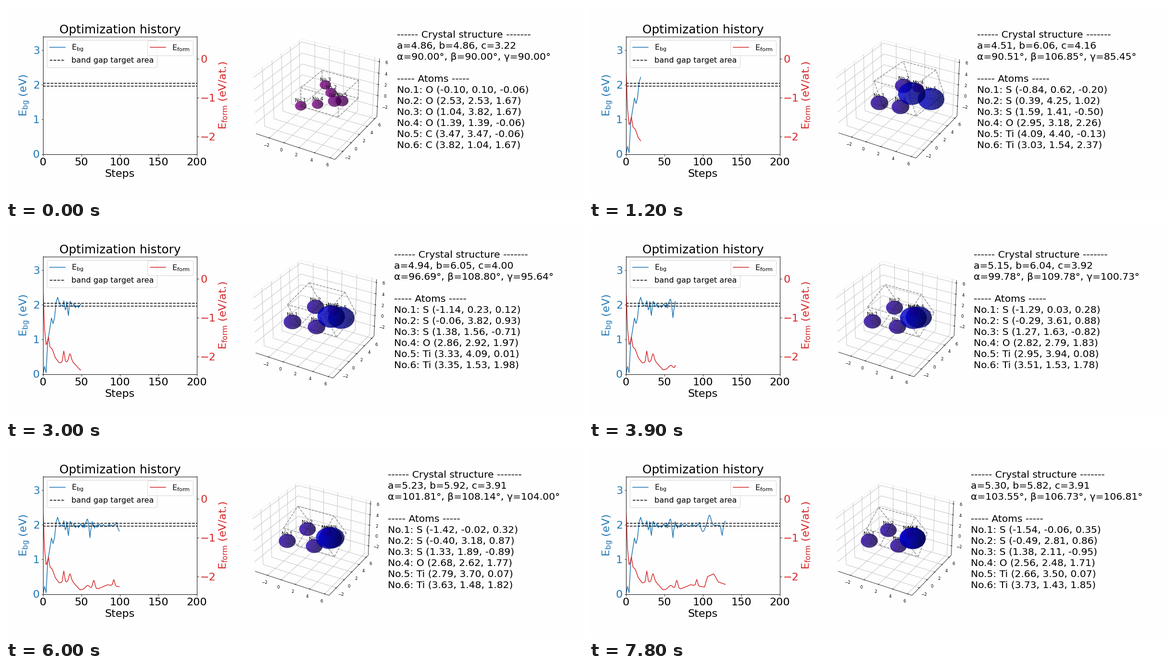
A matplotlib script for the animation above (8000 ms loop, 1200x400 px).

```python
import numpy as np
import matplotlib.pyplot as plt
from matplotlib.animation import FuncAnimation
from matplotlib.collections import LineCollection, PolyCollection

W, H, DPI = 1200, 400, 72          # at 72 dpi one point is one pixel
TICK_MS, HOLD, LAST = 100, 3, 26   # a new state every 300 ms
BG = "#fefefe"

plt.rcParams.update({"font.family": "DejaVu Sans", "mathtext.fontset": "dejavusans",
                     "axes.facecolor": BG, "figure.facecolor": BG})

# ---------- history curves: a coarse trend plus bumps ----------
STEPS = np.arange(5 * LAST)


def curve(trend, bumps):
    y = np.interp(STEPS, *zip(*trend))
    for at, height, width in bumps:
        y += height * np.exp(-((STEPS - at) / width) ** 2)
    return y


GAP_Y = curve([(0, 0), (2, .22), (4, .04), (6, .92), (11, 1.62), (13, 1.46),
               (15, 1.63), (17, 2.08), (19, 2.22), (22, 2), (24, 1.97), (129, 1.99)],
              [(27, .15, .8), (29.3, -.13, .9), (31, .14, .7), (32.8, -.29, 1),
               (35.5, .17, .9), (57.5, .23, 1.8), (61, -.35, 1.2), (64, .12, .8),
               (95.5, .13, 1), (100, -.18, 3), (108.5, .3, 2.8),
               (124.8, -.3, 1.3), (129, .12, 1.5)])
GAP_Y[38:94] += np.random.default_rng(4).normal(0, .035, 56)
FORM_Y = curve([(0, -.25), (2, -1.3), (4, -1.69), (5, -1.67), (7, -1.49), (9, -1.75),
                (12, -1.81), (16, -2.03), (21, -2.16), (38, -2.12), (48, -2.34),
                (72, -2.31), (84, -2.21), (102, -2.27), (106, -2), (114, -1.93),
                (120, -2.14), (129, -2.2)],
               [(27, .29, 1.4), (35, .2, 2), (58, .1, 4), (66, .22, 2), (92, .16, 1.5)])

# ---------- crystal: a symmetric start, then three relaxed key poses ----------
KEYS = [0, 4, 13, LAST]
CELLS = np.array([   # a, b, c, alpha, beta, gamma
    [4.86, 4.86, 3.22, 90, 90, 90],
    [4.51, 6.06, 4.16, 90.51, 106.85, 85.45],
    [5.15, 6.04, 3.92, 99.78, 109.78, 100.73],
    [5.30, 5.82, 3.91, 103.55, 106.73, 106.81]])
M, U, D, Z_LOW, Z_TOP = 2.43, 1.39, .10, -.06, 1.67
POSES = np.array([
    [(-D, D, Z_LOW), (M + D, M + D, Z_TOP), (M - U, M + U, Z_TOP),
     (U, U, Z_LOW), (2 * M - U, 2 * M - U, Z_LOW), (M + U, M - U, Z_TOP)],
    [(-.84, .62, -.20), (.39, 4.25, 1.02), (1.59, 1.41, -.50),
     (2.95, 3.18, 2.26), (4.09, 4.40, -.13), (3.03, 1.54, 2.37)],
    [(-1.29, .03, .28), (-.29, 3.61, .88), (1.27, 1.63, -.82),
     (2.82, 2.79, 1.83), (2.95, 3.94, .08), (3.51, 1.53, 1.78)],
    [(-1.54, -.06, .35), (-.49, 2.81, .86), (1.38, 2.11, -.95),
     (2.56, 2.48, 1.71), (2.66, 3.50, .07), (3.73, 1.43, 1.85)]])
START, LATER = "O O O O C C".split(), "S S S O Ti Ti".split()
RADIUS = {"O": .66, "C": .76, "S": 1.05, "Ti": 1.60}
COLOR = {"O": (.53, 0, .58), "C": (.5, 0, .58), "S": (.16, 0, .68), "Ti": (0, 0, .84)}


def blend(poses, i):
    k = min(np.searchsorted(KEYS, i, side="right"), len(KEYS) - 1)
    t = (i - KEYS[k - 1]) / (KEYS[k] - KEYS[k - 1])
    return poses[k - 1] + t * (poses[k] - poses[k - 1])


# ---------- 3D view: elevation 30, azimuth -60, distance 10 ----------
MID = np.array([1.39, 1.39, 1.36])
HALF = 5.2
UNIT = np.array([1.1905, 1.1905, .8929]) / (2 * HALF)
EL, AZ = np.radians([30, -60])
VIEW = np.array([
    [-np.sin(AZ), np.cos(AZ), 0],
    [-np.sin(EL) * np.cos(AZ), -np.sin(EL) * np.sin(AZ), np.cos(EL)],
    [np.cos(EL) * np.cos(AZ), np.cos(EL) * np.sin(AZ), np.sin(EL)]])
LO, HI = MID - HALF, MID + HALF
TICKS = range(-2, 7, 2)


def project(p, wide):
    """Pixel positions and eye distances; the view shrinks as the text gets wider."""
    q = ((np.asarray(p, float) - MID) * UNIT) @ VIEW.T
    dist = 10 - q[..., 2]
    scale = 1580 - 33.7 * wide
    x = 648 - 3.4 * wide + scale * q[..., 0] / dist
    y = 188 - scale * q[..., 1] / dist
    return np.stack([x, y], -1), dist


(X0, Y0, Z0), (X1, Y1, Z1) = LO, HI
IN, OUT = .17, .09
RIM = [[(X0, Y0, Z1), (X0, Y1, Z1), (X1, Y1, Z1)]]
AXES = [[(X0, Y0, Z0), (X1, Y0, Z0)], [(X1, Y0, Z0), (X1, Y1, Z0)],
        [(X1, Y1, Z0), (X1, Y1, Z1)]]
GRID, TICK_AT = [], []
for t in TICKS:
    GRID += [[(t, Y0, Z0), (t, Y1, Z0), (t, Y1, Z1)],
             [(X1, t, Z0), (X0, t, Z0), (X0, t, Z1)],
             [(X0, Y0, t), (X0, Y1, t), (X1, Y1, t)]]
    AXES += [[(t, Y0 + IN, Z0), (t, Y0 - OUT, Z0)],
             [(X1 - IN, t, Z0), (X1 + OUT, t, Z0)],
             [(X1 - IN, Y1, t), (X1 + OUT, Y1, t)]]
    TICK_AT += [(t, (t, Y0, Z0), (-6, 15.5)), (t, (X1, t, Z0), (9.5, 13.5)),
                (t, (X1, Y1, t), (15, 2))]

# unit sphere as quads with light from the left
th, ph = np.meshgrid(np.linspace(0, np.pi, 15), np.linspace(0, 2 * np.pi, 29),
                     indexing="ij")
ball = np.stack([np.sin(th) * np.cos(ph), np.sin(th) * np.sin(ph), np.cos(th)], -1)
QUADS = np.stack([ball[:-1, :-1], ball[1:, :-1], ball[1:, 1:], ball[:-1, 1:]],
                 2).reshape(-1, 4, 3)
normal = QUADS.mean(1)
normal /= np.linalg.norm(normal, axis=1, keepdims=True)
SHADE = .65 + .35 * normal @ np.array([-2, -2, 1]) / 3


def cell_edges(a, b, c, *angles):
    ca, cb, cg = np.cos(np.radians(angles))
    sg = np.sqrt(1 - cg**2)
    cy = (ca - cb * cg) / sg
    va = np.array([a, 0, 0])
    vb = b * np.array([cg, sg, 0])
    vc = c * np.array([cb, cy, np.sqrt(1 - cb**2 - cy**2)])
    edges = []
    for u, v, w in ((va, vb, vc), (vb, va, vc), (vc, va, vb)):
        edges += [[m * v + n * w, m * v + n * w + u] for m in (0, 1) for n in (0, 1)]
    return edges


def spheres(pos, kinds, wide):
    parts = []
    for p, kind in zip(pos, kinds):
        xy, dist = project(p + RADIUS[kind] * QUADS, wide)
        order = np.argsort(-dist.mean(1))
        rgba = np.full((len(QUADS), 4), .6)
        rgba[:, :3] = np.outer(SHADE, COLOR[kind])
        parts.append((dist.min(), xy[order], rgba[order]))
    parts.sort(key=lambda s: -s[0])
    _, verts, colors = zip(*parts)
    return np.concatenate(verts), np.concatenate(colors)


def report(cell, pos, kinds):
    lines = ["------ Crystal structure -------",
             "a={:.2f}, b={:.2f}, c={:.2f}".format(*cell[:3]),
             "α={:.2f}°, β={:.2f}°, γ={:.2f}°".format(*cell[3:]),
             "", "----- Atoms -----"]
    for n, (p, kind) in enumerate(zip(pos, kinds), 1):
        lines.append("No.{}: {} ({:.2f}, {:.2f}, {:.2f})".format(n, kind, *p))
    return lines


# ---------- history chart ----------
fig = plt.figure(figsize=(W / DPI, H / DPI), dpi=DPI)
left = fig.add_axes([77 / W, 1 - 308.5 / H, 320 / W, 245 / H])
gap_line, = left.plot([], [], color="tab:blue", label=r"E$_{\mathrm{bg}}$")
left.axhline(2.045, color="k", ls="--", label="band gap target area")
left.axhline(1.962, color="k", ls="--")
left.set(xlim=(0, 200), ylim=(0, 3.4), xticks=range(0, 201, 50), yticks=range(4))
left.set_title("Optimization history", fontsize=24.8)
left.set_xlabel("Steps", fontsize=22.3)
left.set_ylabel(r"E$_{\mathrm{bg}}$ (eV)", fontsize=22.3, color="tab:blue")
left.tick_params(labelsize=22.3)
left.tick_params(axis="y", labelcolor="tab:blue")
left.legend(loc="upper left", fontsize=16)

right = left.twinx()
form_line, = right.plot([], [], color="tab:red", label=r"E$_{\mathrm{form}}$")
right.set(ylim=(-2.45, .575), yticks=[-2, -1, 0])
right.set_ylabel(r"E$_{\mathrm{form}}$ (eV/at.)", fontsize=22.3, color="tab:red")
right.tick_params(axis="y", labelsize=22.3, labelcolor="tab:red")
right.legend(loc="upper right", fontsize=16)

# ---------- pixel layer for the 3D view and the report ----------
page = fig.add_axes([0, 0, 1, 1], zorder=5)
page.set(xlim=(0, W), ylim=(H, 0))
page.axis("off")


def add_lines(**style):
    return page.add_collection(LineCollection([], **style), autolim=False)


rim = add_lines(colors="0.93", linewidths=.8, zorder=1)
grid = add_lines(colors="#b8b8b8", linewidths=.8, zorder=1)
frame = add_lines(colors="k", linewidths=.8, zorder=1.5)
cell_box = add_lines(colors="0.55", linewidths=1.4, linestyles="--", zorder=2)
balls = page.add_collection(PolyCollection([], edgecolors="none", zorder=4),
                            autolim=False)
tick_text = [page.text(0, 0, str(t).replace("-", "\u2212"), fontsize=8.6,
                       ha="center", va="center") for t, _, _ in TICK_AT]
tags = [page.text(0, 0, f"No.{n}", fontsize=10, ha="center", va="baseline", zorder=3)
        for n in range(1, 7)]
info = [page.text(0, 66.5 + 22.85 * n, "", fontsize=20.25, va="baseline")
        for n in range(11)]


def update(tick):
    i = min(tick // HOLD, LAST)
    n = max(5 * i, 1)
    gap_line.set_data(STEPS[:n], GAP_Y[:n])
    form_line.set_data(STEPS[:n], FORM_Y[:n])

    cell, pos = blend(CELLS, i), blend(POSES, i)
    kinds = LATER if i else START
    wide = int(sum(cell[3:] >= 99.995))   # angles with a third digit

    for art, segs in ((rim, RIM), (grid, GRID), (frame, AXES),
                      (cell_box, cell_edges(*cell))):
        art.set_segments([project(s, wide)[0] for s in segs])
    for txt, (_, p, shift) in zip(tick_text, TICK_AT):
        txt.set_position(project(p, wide)[0] + shift)
    for txt, p, kind in zip(tags, pos, kinds):
        txt.set_position(project(p + [0, 0, RADIUS[kind]], wide)[0])
    verts, rgba = spheres(pos, kinds, wide)
    balls.set_verts(verts)
    balls.set_facecolor(rgba)
    for txt, line in zip(info, report(cell, pos, kinds)):
        txt.set_text(line)
        txt.set_x(813 - 6.46 * wide)
    return []


anim = FuncAnimation(fig, update, frames=80, interval=TICK_MS, repeat=True,
                     repeat_delay=0, blit=False)
plt.show()
```
